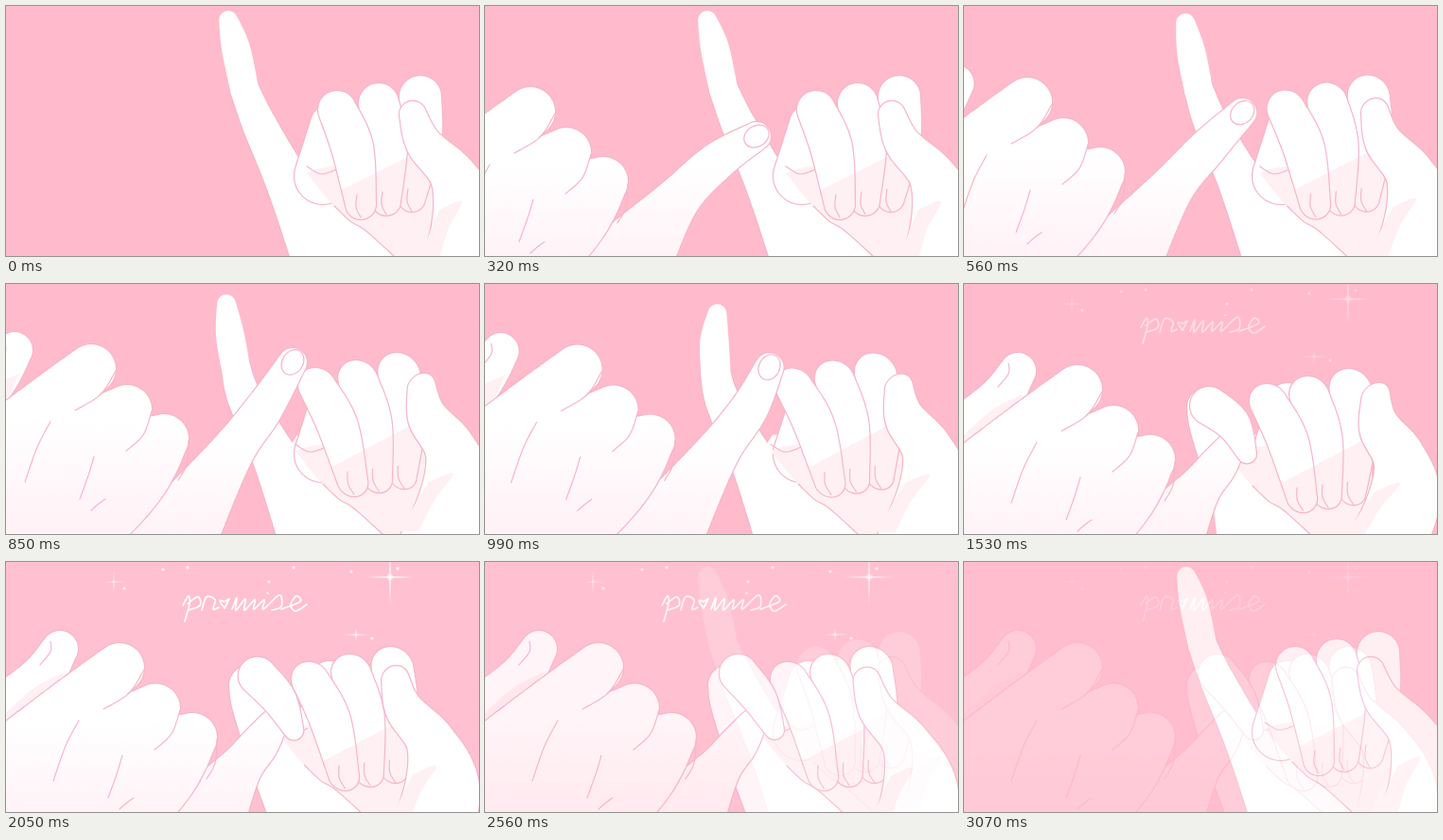
These frames come from a looping animation (500 px wide and 265 px high, 3240 ms). An HTML page:

```html
<!DOCTYPE html>
<html lang="en">
<head>
<meta charset="utf-8">
<title>Promise</title>
<style>
  html, body { margin: 0; width: 100%; height: 100%; overflow: hidden; background: #ffbbcc; }
  svg { display: block; width: 100%; height: 100%; }
  path { stroke-linecap: round; stroke-linejoin: round; }
</style>
</head>
<body>
<svg id="stage" viewBox="0 0 500 265" role="img" aria-label="promise">
  <defs>
    <linearGradient id="skin" gradientUnits="userSpaceOnUse" x1="0" y1="170" x2="0" y2="265">
      <stop offset="0" stop-color="#fff"/>
      <stop offset="1" stop-color="#fff3f7"/>
    </linearGradient>
    <linearGradient id="knuckles" gradientUnits="userSpaceOnUse" x1="386" y1="157" x2="404" y2="193">
      <stop offset=".5" stop-color="#fff"/>
      <stop offset=".5" stop-color="#fff0f4"/>
    </linearGradient>
    <radialGradient id="glow">
      <stop offset="0" stop-color="#fff"/>
      <stop offset=".5" stop-color="#fff" stop-opacity=".6"/>
      <stop offset="1" stop-color="#fff" stop-opacity="0"/>
    </radialGradient>
  </defs>
  <rect width="500" height="265" fill="#ffbbcc"/>
  <rect id="veil" width="500" height="265" fill="#fff"/>
  <g id="sky"></g>
  <g id="right"></g>
  <g id="rightTip"></g>
  <g id="left"></g>
  <g id="restart"><rect width="500" height="265" fill="#ffbbcc"/></g>
</svg>
<script>
const LOOP = 3240;
const KEYS = [320, 850, 1170, 1530, 2220];             // enter, touch, bend, hook, squeeze
const HOLDS = [[8, 80], [4, 70], [2, 80], [7, 90], [9, 170]]; // count, step
const LINE = '#f6b6c8', SHADE = '#fff0f4';
const $ = id => document.getElementById(id);

// Motion: one entry per key time; the last one holds.
const moves = {
  // dx, dy, lean
  fingers: [[0, 0, 0], [-22, -1, .12], [-33, 1, .14], [-29, 16, .1]],
  thumb: [[0, 0, 0], [12, -6, -.2], [4, -3, -.22], [9, 4, -.28], [-26, 11, -.03]],
  palm: [[0, 0, 0], [-12, 0, 0], [-30, 0, 0], [-42, 2, 0], [-28, 4, 0]],
  leftHand: [[-72, 0, 0], [-30, -22, 0], [5, -20, 0], [0, 0, 0]],
  leftThumb: [[-80, 0, 0], [-48, -22, 0], [-13, -17, 0], [0, 0, 0]],
  // x, y of each joint
  rightTip: [[235, 15, 243, 45, 252, 88], [233, 21, 237, 55, 244, 95], [290, 68, 262, 90, 247, 125],
    [299, 180, 284, 148, 259, 129], [306, 178, 290, 145, 268, 118]],
  rightBase: [[252, 88, 268, 126, 300, 190, 345, 275], [243, 88, 252, 120, 285, 185, 330, 275],
    [247, 125, 255, 155, 285, 215, 320, 275], [258, 131, 262, 155, 286, 224, 322, 275]],
  leftPinky: [[287, 138, 245, 165, 202, 207, 150, 275], [303, 83, 272, 133, 236, 182, 175, 275],
    [292, 107, 303, 132, 268, 182, 205, 275], [282, 172, 268, 193, 245, 222, 205, 280]]
};

const LETTERS = '187,46 193,36 194,44 189,63/192,44 203,37 205,46 193,51' +
  '/207,51 212,37 221,40 219,50 225,48' +
  '/231,49 226,41 231,42|236,39 231,49' +
  '/239,50 244,38 243,51 253,39 252,51 263,40 262,50 273,40 272,50 289,35 291,47 281,51/276,33 277,33' +
  '/291,50 311,42 307,36 301,45 306,52 318,45';

const lerp = (a, b, u) => a + (b - a) * u;
const clamp = v => Math.min(1, Math.max(0, v));
const ease = (t, from, to) => clamp((t - from) / (to - from));

function at(name, t) {
  const track = moves[name];
  let i = 0;
  while (i < track.length - 2 && t >= KEYS[i + 1]) i++;
  const u = ease(t, KEYS[i], KEYS[i + 1]);
  return track[i].map((v, k) => lerp(v, track[i + 1][k], u));
}

function add(parent, tag, attrs = {}) {
  const el = document.createElementNS(parent.namespaceURI, tag);
  for (const k in attrs) el.setAttribute(k, attrs[k]);
  return parent.appendChild(el);
}

// Catmull-Rom samples through points of any dimension
function spline(p, n = 20) {
  const out = [];
  for (let i = 0; i < p.length - 1; i++) {
    const a = p[i - 1] || p[i], b = p[i], c = p[i + 1], d = p[i + 2] || c;
    for (let s = 0; s < n; s++) {
      const u = s / n;
      out.push(b.map((v, k) => v + u / 2 * (c[k] - a[k] +
        u * (2 * a[k] - 5 * v + 4 * c[k] - d[k] + u * (3 * (v - c[k]) + d[k] - a[k])))));
    }
  }
  return [...out, p[p.length - 1]];
}

// "/" lifts the pen, "|" turns a corner
function curve(text) {
  return text.split('/').map(stroke => 'M' + stroke.split('|').map(run =>
    spline(run.split(' ').map(s => s.split(',').map(Number)), 8).join('L')).join('L')).join('');
}

// A tapered, rounded limb: overlapping discs along a spine of [x, y, radius]
function limb(spine) {
  return spline(spine).map(([x, y, r]) =>
    `M${x - r} ${y}a${r} ${r} 0 1 1 ${2 * r} 0a${r} ${r} 0 1 1 ${-2 * r} 0`).join('');
}

const joints = (xy, radii) => radii.map((r, i) => [xy[2 * i], xy[2 * i + 1], r]);

function flesh(parent, fill = '#fff') {
  const edge = add(parent, 'path', { fill: 'none', stroke: LINE, 'stroke-width': 2.4 });
  const face = add(parent, 'path', { fill });
  return {
    edge,
    shape(...spines) {
      const d = spines.map(limb).join('');
      edge.setAttribute('d', d);
      face.setAttribute('d', d);
    }
  };
}

const pen = (parent, text) =>
  add(parent, 'path', { d: curve(text), fill: 'none', stroke: LINE, 'stroke-width': 1.2 });
const shade = (parent, text, fill = SHADE) => add(parent, 'path', { d: curve(text), fill });

// Shift a group and lean it around y = 100
function place(group, [dx, dy, lean]) {
  group.setAttribute('transform', `matrix(1 0 ${lean} 1 ${dx - 100 * lean} ${dy})`);
}

function rightHand(parent, tipParent) {
  const base = flesh(parent);
  const palm = add(parent, 'g');
  shade(palm, '300,190 320,160|440,150 470,200|480,270 310,270', '#fff');
  flesh(parent).shape([[342, 125, 20], [335, 180, 30]]);
  const lines = add(parent, 'g');
  shade(lines, '318,177 350,170 470,170|480,266 411,266|380,238 347,212 318,177');
  pen(lines, '347,212 364,228 380,238 411,266/318,170 333,178 350,173');

  const fingers = add(parent, 'g');
  for (let i = 2; i >= 0; i--) {
    flesh(fingers, 'url(#knuckles)').shape([
      [350 + 44 * i, 110 - 7 * i, 20 + i],
      [366 + 36 * i, 150 - 4 * i, 22],
      [375 + 27 * i, 210 - 3 * i, 16 - i]]);
    const nail = pen(fingers, '371,200 370,213 375,224');
    nail.setAttribute('transform', `translate(${27 * i} ${-3 * i})`);
  }

  const thumb = add(parent, 'g');
  flesh(thumb).shape([[430, 115, 14], [442, 146, 19], [474, 182, 25], [490, 235, 40], [478, 300, 45]]);
  shade(thumb, '458,216 482,207 468,235 458,268|437,268 448,240 458,216');

  const tip = flesh(tipParent);
  return t => {
    const curl = ease(t, 850, 1530);
    base.shape(joints(at('rightBase', t), [15 + 7 * curl, 18 + 4 * curl, 24, 40]));
    tip.shape(joints(at('rightTip', t), [10, 15 + 3 * curl, 15 + 5 * curl]));
    tip.edge.setAttribute('opacity', hooked(t) ? 1 : 0);
    place(palm, at('palm', t));
    place(lines, at('palm', t));
    place(fingers, at('fingers', t));
    place(thumb, at('thumb', t));
  };
}

function leftHand(parent) {
  const thumb = add(parent, 'g');
  flesh(thumb).shape([[57, 92, 19], [32, 128, 24], [-30, 185, 34]]);
  shade(thumb, '-30,190 25,137 62,117|30,190');
  pen(thumb, '47,84 47,95 36,109');

  const pinky = flesh(parent, 'url(#skin)');
  const nail = add(parent, 'ellipse', { rx: 14, ry: 11, fill: 'none', stroke: LINE, 'stroke-width': 1.2 });

  const hand = add(parent, 'g');
  const knuckles = [[120, 112], [158, 155], [197, 186]];
  flesh(hand, 'url(#skin)').shape(...knuckles.map(([x, y], i) =>
    [[x, y, 26], [x - 55, y + 45, 30 + 11 * i], [x - 170, y + 145, 40 + 11 * i]]));
  knuckles.forEach(([x, y], i) =>
    pen(hand, `${x + 26},${y + 2} ${x + 10 + 7 * i},${y + 27} ${x - 17 + 16 * i},${y + 44}`));
  pen(hand, '77,168 63,195 50,232/123,205 117,225 108,250/135,250 128,255 120,262');

  return t => {
    const p = at('leftPinky', t);
    pinky.shape(joints(p, [15, 20, 24, 45]));
    place(thumb, at('leftThumb', t));
    place(hand, at('leftHand', t));
    const turn = Math.atan2(p[1] - p[3], p[0] - p[2]) * 180 / Math.PI;
    nail.setAttribute('transform', `translate(${p[0]} ${p[1]}) rotate(${turn})`);
    nail.setAttribute('opacity', t < 1080 ? 1 : 0);
    const away = 1 - ease(t, 0, 320);
    parent.setAttribute('transform', `translate(${-330 * away ** 1.4} ${45 * away})`);
  };
}

function sparkle(x, y, w, h) {
  for (const [rx, ry] of [[w, 1.1], [1.1, h], [w / 7, w / 7]])
    add($('sky'), 'ellipse', { cx: x, cy: y, rx, ry, fill: 'url(#glow)', opacity: w / 30 });
}

const hooked = t => t >= 1260;

sparkle(406, 16, 30, 34);
sparkle(114, 21, 14, 15);
sparkle(370, 77, 17, 9);
for (const [x, y] of [[166, 8], [192, 6], [278, 21], [304, 6], [365, 10], [387, 81], [414, 7], [125, 28]])
  add($('sky'), 'circle', { cx: x, cy: y, r: 2.2, fill: 'url(#glow)' });
add($('sky'), 'path', { d: curve(LETTERS), fill: 'none', stroke: '#fff', 'stroke-width': 1.7 });

const drawRight = rightHand($('right'), $('rightTip'));
const drawLeft = leftHand($('left'));
rightHand($('restart'), $('restart'))(0);

// Start of the still that is showing at time t
function hold(t) {
  let start = 0;
  for (const [n, step] of HOLDS) {
    if (t < start + n * step) return start + Math.floor((t - start) / step) * step;
    start += n * step;
  }
  return start;
}

function draw(t) {
  drawRight(t);
  drawLeft(t);
  $('stage').insertBefore($('rightTip'), hooked(t) ? $('restart') : $('left'));
  $('sky').setAttribute('opacity', ease(t, 1080, 1980));
  $('veil').setAttribute('opacity', .12 * ease(t, 1530, 2220));
  $('restart').setAttribute('opacity', ease(t, 2220, LOOP) ** 1.7);
}

let begin;
function tick(now) {
  begin ??= now;
  draw(hold((now - begin) % LOOP));
  requestAnimationFrame(tick);
}
draw(0);
requestAnimationFrame(tick);
</script>
</body>
</html>
```
